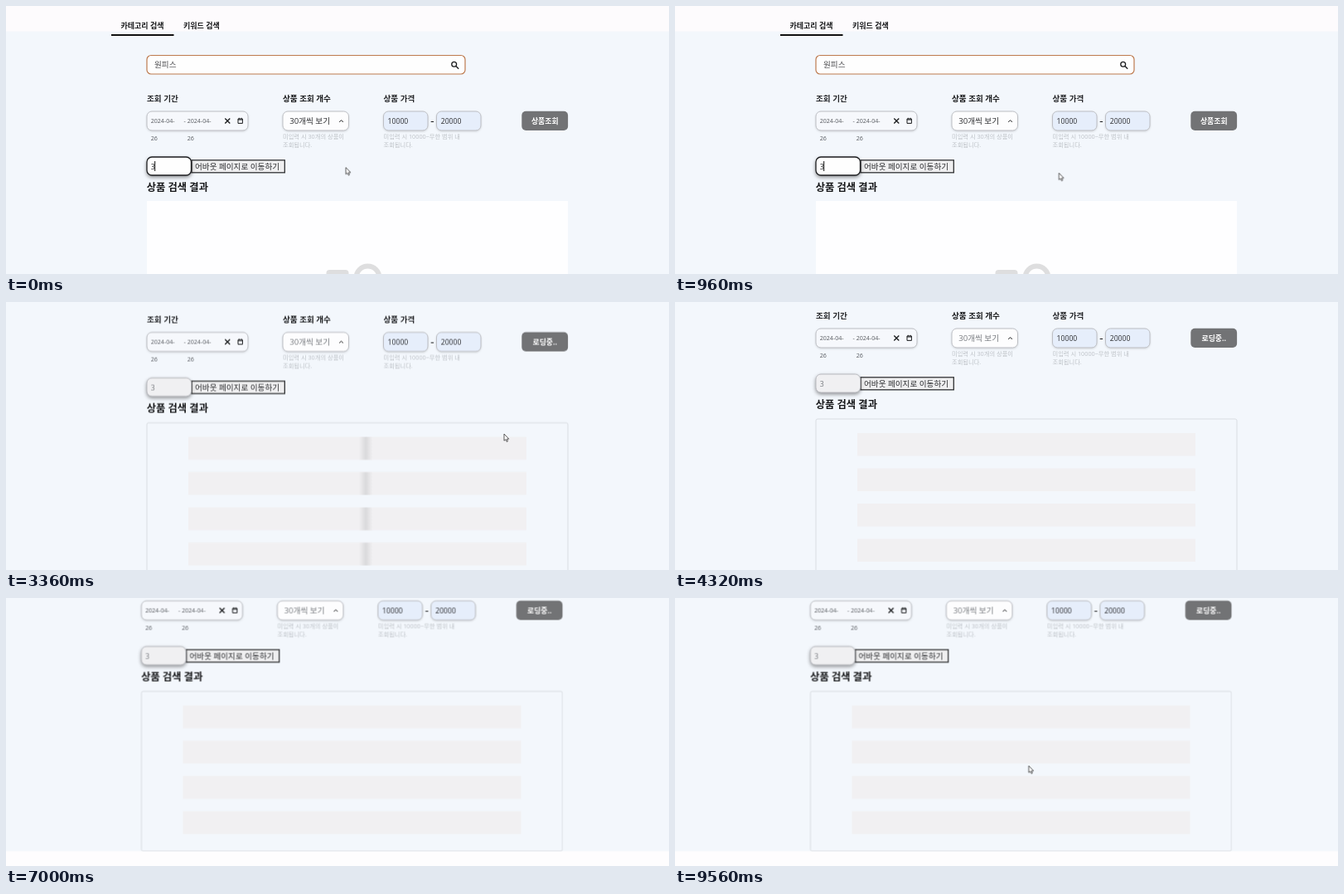
These frames come from a looping animation (800 by 323 pixels, 9.68 s). An HTML page:

```html
<!DOCTYPE html>
<html lang="ko">
<head>
<meta charset="utf-8">
<title>상품 검색</title>
<style>
  html, body { margin: 0; width: 100%; height: 100%; overflow: hidden; background: #f3f7fc; }
  svg { display: block; width: 800px; height: 323px; }
  text { font: 9.6px "Open Sans", "Noto Sans CJK KR", "Noto Sans CJK", sans-serif; fill: #2b2c2f; white-space: pre; }
  .bold { font-weight: 700; fill: #17181a; }
  .semi { font-weight: 600; fill: #222326; }
  .tab { font-size: 9px; }
  .date { font-size: 7.1px; fill: #55585d; }
  .hint { font-size: 7.25px; fill: #bcc0c6; }
  .price { font-size: 8.7px; }
  .button { font-size: 8.9px; font-weight: 700; fill: #fff; text-anchor: middle; }
  .title { font-size: 12.3px; }
  .muted { fill: #777a7f; }
  .field { stroke: #bdbfc4; filter: drop-shadow(0 1px 1px #0002); }
  .lifted { filter: drop-shadow(0 2px 2px #0006); }
  .icon { fill: none; stroke: #191a1c; stroke-width: 1.3; }

  .page, .idle, .busy, .caret, .band, .pointer, .resize { animation: 9680ms linear infinite; }
  .page { animation-name: scroll; }
  .idle { animation-name: idle; animation-timing-function: step-end; }
  .busy { animation-name: busy; animation-timing-function: step-end; }
  .caret { animation-name: blink; animation-timing-function: step-end; }
  .band { animation-name: shimmer; }
  .pointer { animation-name: point; animation-timing-function: ease-in-out; }
  .resize { animation-name: peek; animation-timing-function: step-end; }

  @keyframes scroll {
    0% { transform: none; }
    31.82% { transform: translate(0, 0); animation-timing-function: ease-out; }
    35.33% { transform: translate(0, -95px); animation-timing-function: step-end; }
    53.719% { transform: translate(0, -95.5px); animation-timing-function: step-end; }
    65.08% { transform: translate(-6.6px, -95.5px); animation-timing-function: ease-out; }
    69.21%, 100% { transform: translate(-6.6px, -123.5px); }
  }
  @keyframes idle { 0% { opacity: 1; } 27.685%, 100% { opacity: 0; } }
  @keyframes busy { 0% { opacity: 0; } 27.685%, 100% { opacity: 1; } }
  @keyframes blink {
    0%, 6.715%, 17.665% { opacity: 1; }
    1.24%, 12.19%, 23.14%, 100% { opacity: 0; }
  }
  @keyframes shimmer {
    0%, 27.893%, 53.719%, 79.545% { transform: translateX(-26px); }
    40.806%, 66.632%, 92.459%, 100% { transform: translateX(428px); animation-timing-function: step-end; }
  }
  @keyframes point {
    0% { transform: translate(410px, 194.5px); }
    9.917%, 10.744% { transform: translate(463.3px, 201.3px); }
    20.248%, 28.099% { transform: translate(643px, 144.5px); animation-timing-function: ease-out; }
    30.579% { transform: translate(600.3px, 164.3px); }
    32%, 38.017% { transform: translate(601px, 159px); animation-timing-function: ease-in; }
    44.628% { transform: translate(368px, 324px); animation-timing-function: step-end; }
    85.124% { transform: translate(347px, 306px); }
    95.041%, 100% { transform: translate(426.8px, 202.2px); }
  }
  @keyframes peek {
    0%, 50% { opacity: 0; }
    49.174%, 74.793% { opacity: 1; }
    85.124%, 100% { opacity: 0; }
  }
</style>
</head>
<body>
<svg viewBox="0 0 800 323">
  <defs>
    <linearGradient id="shade">
      <stop offset="0" stop-color="#f1f0f2"/>
      <stop offset=".5" stop-color="#dadadc"/>
      <stop offset="1" stop-color="#f1f0f2"/>
    </linearGradient>
    <g id="rows">
      <path d="M220 253h408v27.5h-408zM220 295.5h408v27.5h-408zM220 338h408v27.5h-408zM220 380.5h408v27.5h-408z"/>
    </g>
    <clipPath id="rowClip">
      <path d="M220 253h408v27.5h-408zM220 295.5h408v27.5h-408zM220 338h408v27.5h-408zM220 380.5h408v27.5h-408z"/>
    </clipPath>
  </defs>

  <g class="page">
    <rect x="-10" width="830" height="450" fill="#f3f7fc"/>
    <rect x="-10" width="830" height="30.5" fill="#fdfbfd"/>
    <rect x="-10" y="428.5" width="830" height="60" fill="#fefdfe"/>

    <text class="bold tab" x="138.5" y="26.5">카테고리 검색</text>
    <text class="bold tab" x="214" y="26.5">키워드 검색</text>
    <rect x="127" y="34" width="75.5" height="2" fill="#111"/>

    <rect x="170" y="59.5" width="384" height="22.5" rx="5" fill="#fefefe" stroke="#bd7a4e" stroke-width="1.2"/>
    <text x="179" y="74.3" fill-opacity=".85">원피스</text>
    <path class="icon" d="M543 72.5l3.2 3.2M543.6 70.2a2.9 2.9 0 1 1-5.8 0a2.9 2.9 0 1 1 5.8 0z"/>

    <text class="semi" x="170" y="114.5">조회 기간</text>
    <text class="bold" x="334" y="114.5">상품 조회 개수</text>
    <text class="semi" x="455.5" y="114.5">상품 가격</text>

    <rect class="field" x="170" y="127" width="122" height="23" rx="6" fill="#f6f8fc"/>
    <text class="date" x="174.7" y="141">2024-04-</text>
    <text class="date" x="174.7" y="162.3">26</text>
    <text class="date" x="214.5" y="141">-</text>
    <text class="date" x="218.7" y="141">2024-04-</text>
    <text class="date" x="218.7" y="162.3">26</text>
    <path class="icon" stroke-width="1.5" d="M264.3 135.5l6 6m0-6l-6 6"/>
    <path class="icon" style="stroke-width:1" d="M280 136h5.4v5.4h-5.4zM280 137h5.4M281.3 134.8v1.2M284.1 134.8v1.2"/>

    <rect class="field" x="334" y="127" width="79.5" height="23" rx="6" fill="#fdfdfe"/>
    <text class="idle" x="342.2" y="142.2">30개씩 보기</text>
    <text class="busy muted" x="342.2" y="142.2">30개씩 보기</text>
    <path class="icon" style="stroke-width:1" d="M402.2 139.8l2.3-2.1l2.3 2.1"/>
    <text class="hint" x="334" y="160">미입력 시 30개의 상품이</text>
    <text class="hint" x="334" y="169.5">조회됩니다.</text>

    <rect class="field" x="455.5" y="127" width="53.5" height="23" rx="6" fill="#e6eefb"/>
    <rect class="field" x="519.5" y="127" width="53.5" height="23" rx="6" fill="#e6eefb"/>
    <text class="price" x="460.5" y="142">10000</text>
    <text class="price" x="524.7" y="142">20000</text>
    <path class="icon" style="stroke-width:1" d="M512.7 139.5h3.4"/>
    <text class="hint" x="455.5" y="160">미입력 시 10000~무한 범위 내</text>
    <text class="hint" x="455.5" y="169.5">조회됩니다.</text>

    <rect x="622.3" y="126.7" width="55.8" height="23.3" rx="5" fill="#727375"/>
    <text class="button idle" x="650.3" y="141.5">상품조회</text>
    <text class="button busy" x="650.3" y="141.5">로딩중..</text>

    <rect x="224" y="185.8" width="112.3" height="15" fill="#efeff0" stroke="#303133" stroke-width="1.3"/>
    <text x="228" y="196.6">어바웃 페이지로 이동하기</text>

    <g class="idle">
      <rect class="lifted" x="170" y="182" width="53.5" height="22" rx="6" fill="#fefefe" stroke="#1c1d1f" stroke-width="1.3"/>
      <text class="price" x="174.7" y="196.5">3</text>
      <rect class="caret" x="179.2" y="187" width="1" height="12" fill="#111"/>
    </g>
    <g class="busy">
      <rect class="lifted" x="170" y="182" width="53.5" height="22" rx="6" fill="#f0f0f2" stroke="#b9babf"/>
      <text class="price muted" x="174.7" y="196.5">3</text>
    </g>

    <text class="bold title" x="169.7" y="222.8">상품 검색 결과</text>

    <g class="idle">
      <rect x="170" y="235" width="508" height="193.5" fill="#fefeff"/>
      <rect x="386.5" y="318" width="27" height="30" rx="4" fill="#dededf"/>
      <circle cx="436.5" cy="327.5" r="14" fill="none" stroke="#dededf" stroke-width="6"/>
    </g>
    <g class="busy">
      <rect x="170" y="236" width="508" height="192.5" rx="2" fill="none" stroke="#d9dde2"/>
      <use href="#rows" fill="#f1f0f2"/>
      <g clip-path="url(#rowClip)">
        <rect class="band" x="212" y="250" width="16" height="160" fill="url(#shade)"/>
      </g>
    </g>
  </g>

  <path class="resize" d="M348 319.5l3.3 3.3h-2.3v5h-2v-5h-2.3z" fill="#fff" stroke="#333" stroke-width=".8"/>
  <path class="pointer" d="M0 0V8.2L1.9 6.6L3.2 9.4L4.5 8.8L3.3 6.1H5.8Z" fill="#fff" stroke="#333" stroke-width=".8"/>
</svg>
</body>
</html>
```
